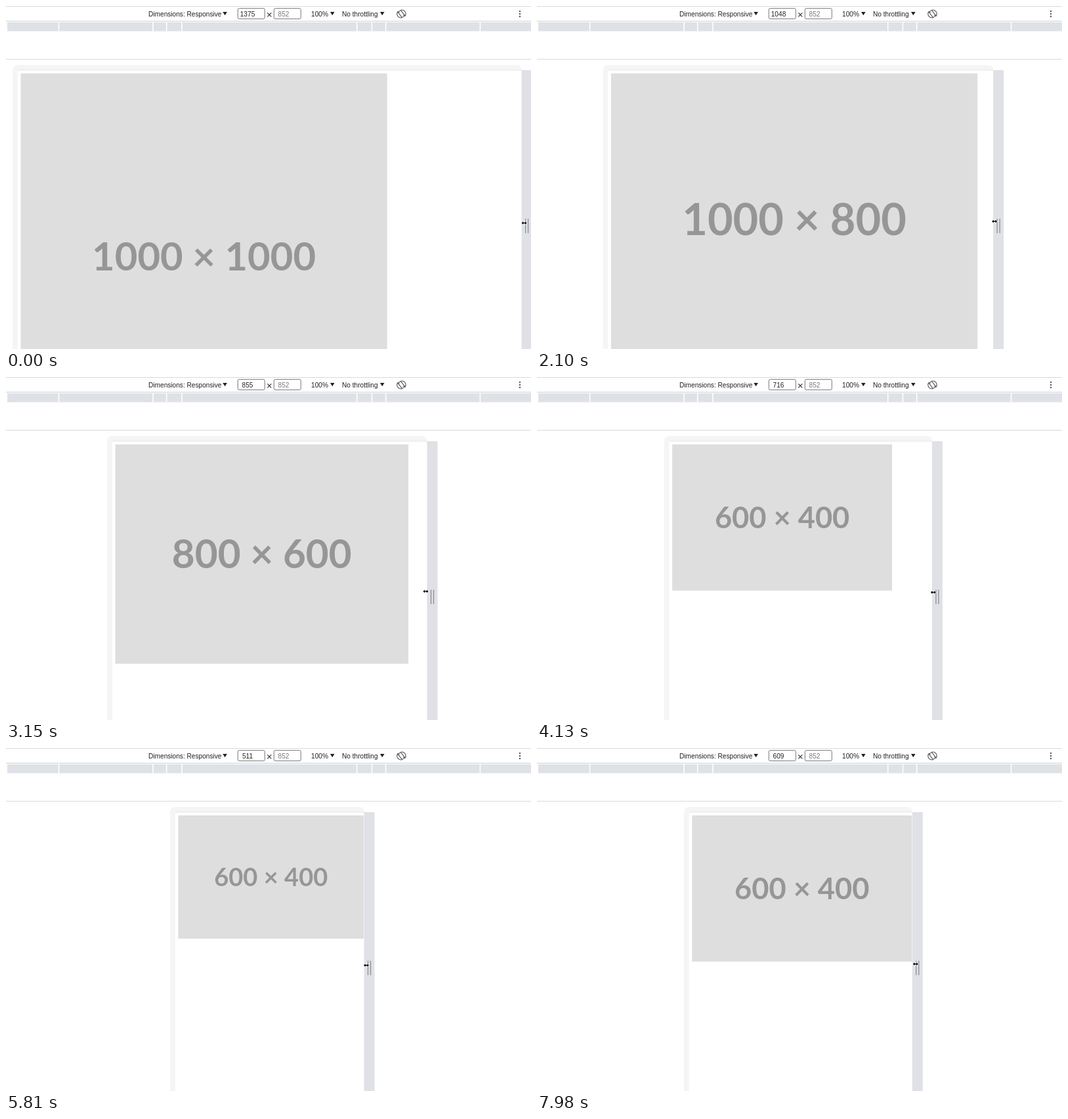
Animation, 800 px wide and 524 px high, one loop 8000 ms. Source, as an HTML page:

```html
<!DOCTYPE html>
<html lang="en">
<head>
<meta charset="utf-8">
<title>Responsive image resize</title>
<style>
  html, body { margin: 0; width: 100%; height: 100%; overflow: hidden; background: #fff; }
  svg { display: block; }
  .ui { font: 10.15px "Liberation Sans", Arial, sans-serif; fill: #222; }
  .ui .dim { fill: #777; }
  .label { font-family: Lato, sans-serif; font-weight: 700; fill: #969696; text-anchor: middle; }
  .mid { text-anchor: middle; }
  .box { fill: #fff; stroke: #777; }
  .icon { fill: none; stroke: #555; stroke-width: 1.1; }
</style>
</head>
<body>
<svg width="800" height="524" viewBox="0 0 800 524">
  <path id="frame" fill="#f5f5f5"/>
  <rect id="page" y="98" height="426" fill="#fff"/>
  <rect id="pageTop" y="97.5" height="1" fill="#e6e6e6"/>
  <rect id="image" y="103" fill="#dedede"/>
  <text id="label" class="label"></text>
  <g id="handle">
    <rect y="98" width="16" height="426" fill="#dfe1e6"/>
    <path d="M6 325V347M10 325V347" stroke="#8d8f92" stroke-width="1.3"/>
  </g>
  <path id="cursor" d="M-4 0L-1.4 -2.6V-.7H1.4V-2.6L4 0L1.4 2.6V.7H-1.4V2.6Z"
        stroke="#fff" stroke-width="1.2" paint-order="stroke"/>

  <path d="M0 .5H800" stroke="#d8d8d8"/>
  <path d="M0 23.2H800" stroke="#c9cbce"/>
  <path d="M0 81.3H800" stroke="#d8d8d8"/>
  <rect x="2" y="25" width="798" height="13.5" fill="#dee1e6"/>
  <path id="ticks" stroke="#fff" stroke-width="1.6"/>

  <g class="ui">
    <text x="217" y="15.5">Dimensions: Responsive</text>
    <text x="465" y="15.5">100%</text>
    <text x="512" y="15.5">No throttling</text>
    <path id="carets"/>
    <rect class="box" x="353.3" y="3.7" width="41" height="16" rx="2"/>
    <rect class="box" x="408.3" y="3.7" width="41" height="16" rx="2"/>
    <text id="width" class="mid" x="368" y="15.5"></text>
    <text class="mid dim" x="423" y="15.5">852</text>
    <path d="M398.3 10.3L404.3 16.3M404.3 10.3L398.3 16.3" stroke="#333" stroke-width="1.2"/>
    <g class="icon" transform="translate(602.5 12)">
      <rect x="-2.6" y="-5.2" width="5.2" height="10.4" rx="1.4" transform="rotate(-38)"/>
      <path d="M-1.5 -5.5A5.8 5.8 0 0 1 5.6 3M3 1.8L5.5 3.4L7 .8M1.5 5.5A5.8 5.8 0 0 1 -5.6 -3M-3 -1.8L-5.5 -3.4L-7 -.8"/>
    </g>
    <g fill="#5f6368">
      <circle cx="783" cy="8" r="1.3"/><circle cx="783" cy="12" r="1.3"/><circle cx="783" cy="16" r="1.3"/>
    </g>
  </g>
</svg>
<script>
const LOOP = 8000, STEP = 70;
const SCALE = 0.5583, CENTER = 401.8, IMAGE_TOP = 103;

// time, typed width, laid-out width, pointer offset from the handle, pointer y
const KEYS = [
  [0, 1375, 1375, 4, 331.5],
  [350, 1375, 1375, 4, 331.5],
  [1260, 1214, 1216, -3, 330],
  [2100, 1048, 1051, 2, 329],
  [3150, 855, 859, -2, 327.5],
  [4130, 716, 717, 2, 329],
  [5810, 511, 515, 3.5, 332],
  [6400, 487, 488, 4, 332],
  [7980, 609, 609, 5, 330]
];

// min viewport width, image width, image height
const SOURCES = [[1200, 1000, 1000], [1000, 1000, 800], [800, 800, 600], [0, 600, 400]];

const $ = id => document.getElementById(id);
const set = (id, attrs) => {
  for (const name in attrs) $(id).setAttribute(name, attrs[name]);
};

set('ticks', { d: [80.5, 224, 244.7, 268, 534.7, 557.5, 578.7, 722.5].map(x => `M${x} 25V38.5`).join('') });
set('carets', { d: [330.3, 494, 570].map(x => `M${x} 9h6.6l-3.3 5.2z`).join('') });

function slope(i, column) {
  if (i < 2) return 0;
  const a = KEYS[i - 1], b = KEYS[Math.min(i + 1, KEYS.length - 1)];
  const before = KEYS[i][column] - a[column], after = b[column] - KEYS[i][column];
  if (before * after < 0) return 0;
  return (b[column] - a[column]) / (b[0] - a[0]);
}

// Cubic Hermite curve through the keys
function sample(t, column) {
  const next = KEYS.findIndex(key => key[0] > t);
  const i = (next < 0 ? KEYS.length - 1 : next) - 1;
  const [a, b] = [KEYS[i], KEYS[i + 1]];
  const span = b[0] - a[0], u = (t - a[0]) / span, ease = u * u * (3 - 2 * u);
  return a[column] * (1 - ease) + b[column] * ease
    + span * u * (1 - u) * ((1 - u) * slope(i, column) - u * slope(i + 1, column));
}

function render(t) {
  const viewport = sample(t, 2);
  const width = viewport * SCALE;
  const left = CENTER - width / 2, right = left + width;

  $('width').textContent = Math.round(sample(t, 1));
  set('frame', { d: `M${left - 8} 524V99q0 -9 9 -9H${right - 8}q8 0 8 8H${left}V524Z` });
  set('page', { x: left, width });
  set('pageTop', { x: left, width });
  set('handle', { transform: `translate(${right} 0)` });
  set('cursor', { transform: `translate(${right + sample(t, 3)} ${sample(t, 4)})` });

  const [, w, h] = SOURCES.find(([min]) => viewport >= min);
  const imageWidth = Math.min(w, viewport - 9) * SCALE;
  const imageHeight = imageWidth * h / w;
  const imageLeft = left + 8 * SCALE;
  set('image', { x: imageLeft, width: imageWidth, height: imageHeight });

  // The caption fills 60% of the image
  const glyphs = `${w}×${h}`.length;
  const size = 0.6 * imageWidth / (0.58 * glyphs + 0.386);
  $('label').textContent = `${w} × ${h}`;
  set('label', {
    x: imageLeft + imageWidth / 2,
    y: IMAGE_TOP + imageHeight / 2 + 0.36 * size,
    'font-size': size
  });
}

const start = performance.now();
function tick() {
  const t = (performance.now() - start) % LOOP;
  render(Math.floor(t / STEP) * STEP);
  requestAnimationFrame(tick);
}
tick();
</script>
</body>
</html>
```
